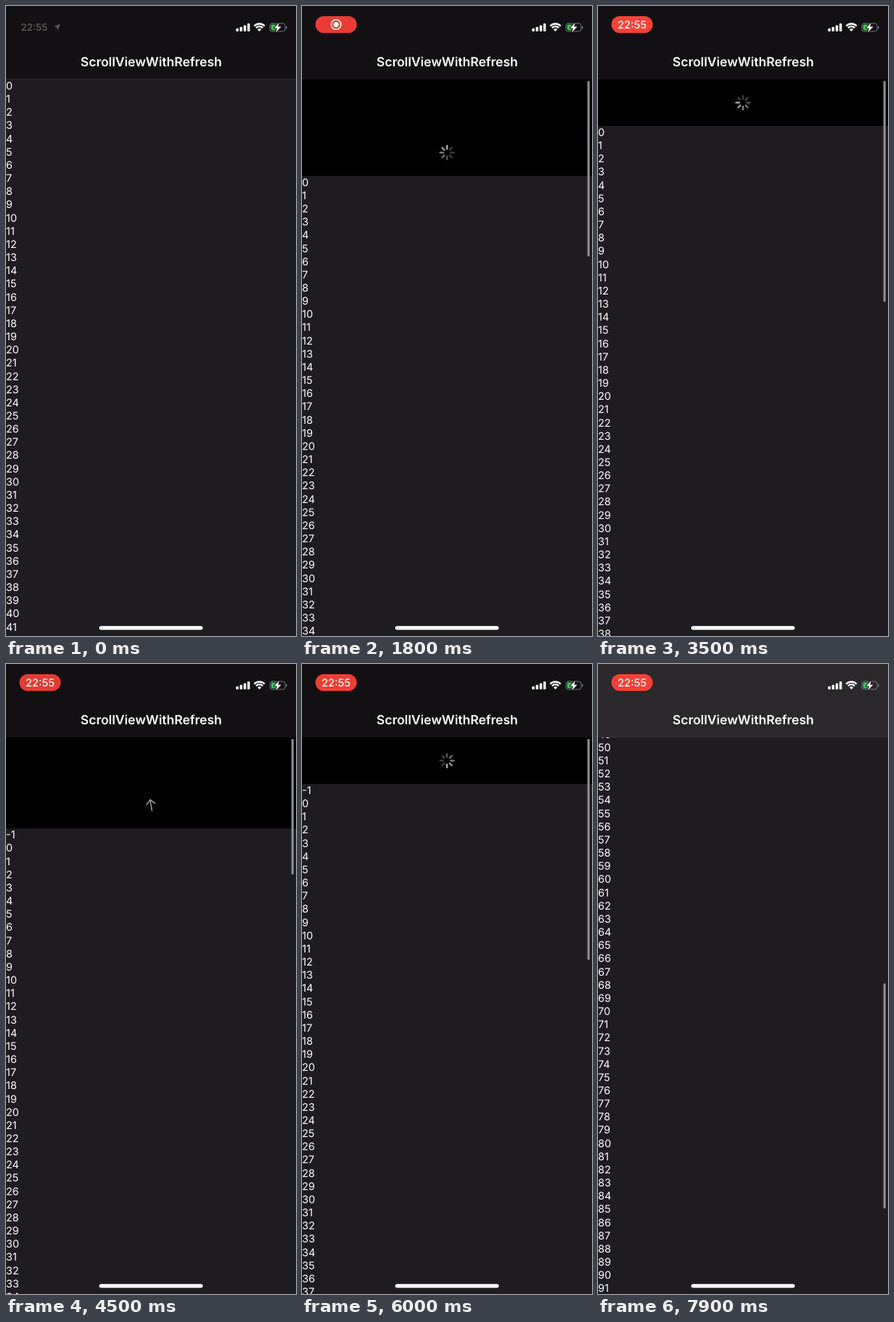
An HTML page with a canvas for the animation above (8 s loop, 400 px wide and 867 px high).

```html
<!DOCTYPE html>
<html>
<head>
<meta charset="utf-8">
<style>
  html, body { margin: 0; width: 100%; height: 100%; overflow: hidden; background: #000; }
  canvas { display: block; }
</style>
</head>
<body>
<canvas id="stage" width="400" height="867"></canvas>
<script>
const ctx = document.getElementById('stage').getContext('2d');
const LOOP = 8000, NAV = 101, ROW = 18.16, HOLD = 64, THRESHOLD = 128;
const FONT = 'Inter, "Liberation Sans", sans-serif';

const clamp = (v, a = 0, b = 1) => Math.min(b, Math.max(a, v));
const ramp = (t, from, to) => clamp((t - from) / (to - from));
const mix = (a, b, p) => `rgb(${a.map((v, i) => Math.round(v + (b[i] - v) * p))})`;

const linear = p => p;
const speedUp = p => p * p;
const slowDown = p => 1 - (1 - p) ** 2;
const settle = p => 1 - (1 - p) ** 3;
const fling = p => p ** 1.6;

// Vertical offset of the list: [time, offset, easing towards it]
const track = [
  [0, 0, linear], [950, 0, linear], [1300, 50, speedUp], [2000, 140, slowDown],
  [2400, HOLD, settle], [3744, HOLD, linear], [4050, 0, slowDown],
  [4060, 0, linear], [4500, 125, speedUp], [4750, 165, slowDown],
  [5000, 165, linear], [5450, HOLD, settle], [6500, HOLD, linear],
  [6850, 0, slowDown], [7250, 0, linear], [7900, -938, fling], [8000, -1085, linear]
];
const refreshes = [[1744, 3744], [4510, 6500]];

function offsetAt(t) {
  const i = Math.max(1, track.findIndex(k => k[0] > t));
  const [t0, y0] = track[i - 1], [t1, y1, ease] = track[i];
  return y0 + (y1 - y0) * ease(ramp(t, t0, t1));
}

function pill(x, y, w, h, r, color) {
  ctx.fillStyle = color;
  ctx.beginPath();
  ctx.roundRect(x, y, w, h, r);
  ctx.fill();
}

function line(points, color, width) {
  ctx.strokeStyle = color;
  ctx.lineWidth = width;
  ctx.beginPath();
  points.forEach(p => ctx.lineTo(...p));
  ctx.stroke();
}

function shape(points, color) {
  ctx.fillStyle = color;
  ctx.beginPath();
  points.forEach(p => ctx.lineTo(...p));
  ctx.closePath();
  ctx.fill();
}

function text(s, x, y, font, color, align = 'left') {
  ctx.font = `${font} ${FONT}`;
  ctx.fillStyle = color;
  ctx.textAlign = align;
  ctx.fillText(s, x, y);
}

function drawArrow(y) {
  ctx.rotate(Math.PI * ramp(y, THRESHOLD * 0.6, THRESHOLD));
  line([[0, -7.5], [0, 7.5]], '#a8a8a8', 1.4);
  line([[-6, 1.5], [0, 7.5], [6, 1.5]], '#a8a8a8', 1.4);
}

function drawSpinner(elapsed) {
  const head = Math.round(elapsed / 125);
  for (let i = 0; i < 8; i++) {
    const age = (((head - i) % 8) + 8) % 8;
    const v = Math.round(165 - 105 * Math.min(age, 5) / 5);
    ctx.save();
    ctx.rotate(i * Math.PI / 4);
    line([[0, -5.3], [0, -9.3]], `rgb(${v},${v},${v})`, 2.6);
    ctx.restore();
  }
}

function drawList(t, y) {
  const top = NAV + y;
  const first = -refreshes.filter(r => t >= r[1]).length;
  const active = refreshes.find(r => t >= r[0] && t < r[1]);
  ctx.fillStyle = '#000';
  ctx.fillRect(0, 0, 400, 867);
  ctx.fillStyle = '#1e1c20';
  ctx.fillRect(0, top, 400, 2000);

  if (y > 0) {
    ctx.save();
    ctx.translate(200, top - 32);
    if (active) drawSpinner(t - active[0]);
    else drawArrow(y);
    ctx.restore();
  }

  for (let n = first; n < 100; n++) {
    const base = top + (n - first) * ROW + 14;
    if (base > 85 && base < 885) text(n, 0, base, '14.5px', '#fff');
  }

  if (t >= 950) {
    // The scroll bar shrinks faster the further the list is pulled
    const held = active ? Math.min(y, HOLD) : 0;
    const pull = Math.max(0, y - held);
    const length = 310 - 0.09 * held - pull * (0.82 + 0.0013 * pull);
    ctx.globalAlpha = ramp(t, 950, 1100);
    pill(393.6, 103 + 0.358 * Math.max(0, -y), 3.2, length, 1.6, '#8b8a8d');
    ctx.globalAlpha = 1;
  }
}

function drawNav(y) {
  const under = ramp(-y, 0, 100);
  ctx.fillStyle = mix([18, 16, 19], [42, 40, 43], under);
  ctx.fillRect(0, 0, 400, NAV);
  if (y < 1) {
    ctx.fillStyle = mix([42, 40, 43], [50, 49, 52], under);
    ctx.fillRect(0, 100, 400, 1);
  }
  text('ScrollViewWithRefresh', 200.3, 83.2, '600 17.5px', '#fff', 'center');
}

function drawClock(t) {
  ctx.globalAlpha = 1 - ramp(t, 50, 350);
  text('22:55', 20.5, 34.3, '500 13.4px', '#625b5e');
  shape([[75, 24.5], [71, 34], [70.3, 29.3], [65.8, 28.6]], '#625b5e');

  const shown = ramp(t, 250, 550), time = ramp(t, 3200, 3450);
  const pulse = 0.5 - 0.5 * Math.cos((t - 7000) / 1380 * 2 * Math.PI);
  ctx.globalAlpha = shown;
  pill(18.5, 14, 57, 23, 11.5, mix([217, 56, 49], [255, 66, 55], pulse));

  ctx.globalAlpha = shown * (1 - time);
  ctx.strokeStyle = ctx.fillStyle = '#fff';
  ctx.lineWidth = 1.6;
  ctx.beginPath();
  ctx.arc(47, 25.5, 6.7, 0, 7);
  ctx.stroke();
  ctx.beginPath();
  ctx.arc(47, 25.5, 3.6, 0, 7);
  ctx.fill();

  ctx.globalAlpha = shown * time;
  text('22:55', 47, 30.8, '500 14.6px', '#fff', 'center');
  ctx.globalAlpha = 1;
}

function drawStatusIcons() {
  [4.2, 6.2, 8.6, 11].forEach((h, i) => pill(317.3 + i * 5.2, 35 - h, 3.5, h, 1, '#fff'));

  // Wi-Fi fan
  ctx.save();
  ctx.lineCap = 'butt';
  ctx.strokeStyle = ctx.fillStyle = '#fff';
  ctx.lineWidth = 2.3;
  for (const r of [10.3, 6.6]) {
    ctx.beginPath();
    ctx.arc(349.5, 34.8, r, -Math.PI * 0.75, -Math.PI * 0.25);
    ctx.stroke();
  }
  ctx.beginPath();
  ctx.moveTo(349.5, 35);
  ctx.arc(349.5, 34.8, 3.7, -Math.PI * 0.75, -Math.PI * 0.25);
  ctx.fill();
  ctx.restore();

  // Charging battery
  ctx.strokeStyle = '#77767a';
  ctx.lineWidth = 1;
  ctx.beginPath();
  ctx.roundRect(364, 24, 21, 11, 3.2);
  ctx.stroke();
  pill(386.2, 27.7, 1.4, 3.8, 0.7, '#77767a');
  pill(365.6, 25.6, 8, 7.8, 1.8, '#32c85a');
  const bolt = [[377, 22.8], [369.6, 30.4], [374, 30.4], [372.2, 36.4], [379.6, 28.6], [375.2, 28.6]];
  line([...bolt, bolt[0]], '#121013', 2);
  shape(bolt, '#fff');
}

function draw(now) {
  const t = now % LOOP, y = offsetAt(t);
  ctx.lineCap = ctx.lineJoin = 'round';
  ctx.textRendering = 'geometricPrecision';
  drawList(t, y);
  drawNav(y);
  drawClock(t);
  drawStatusIcons();
  pill(128.5, 853.2, 143, 5.3, 2.65, '#fff');
}

const start = performance.now();
function tick() {
  draw(performance.now() - start);
  requestAnimationFrame(tick);
}
tick();
</script>
</body>
</html>
```
